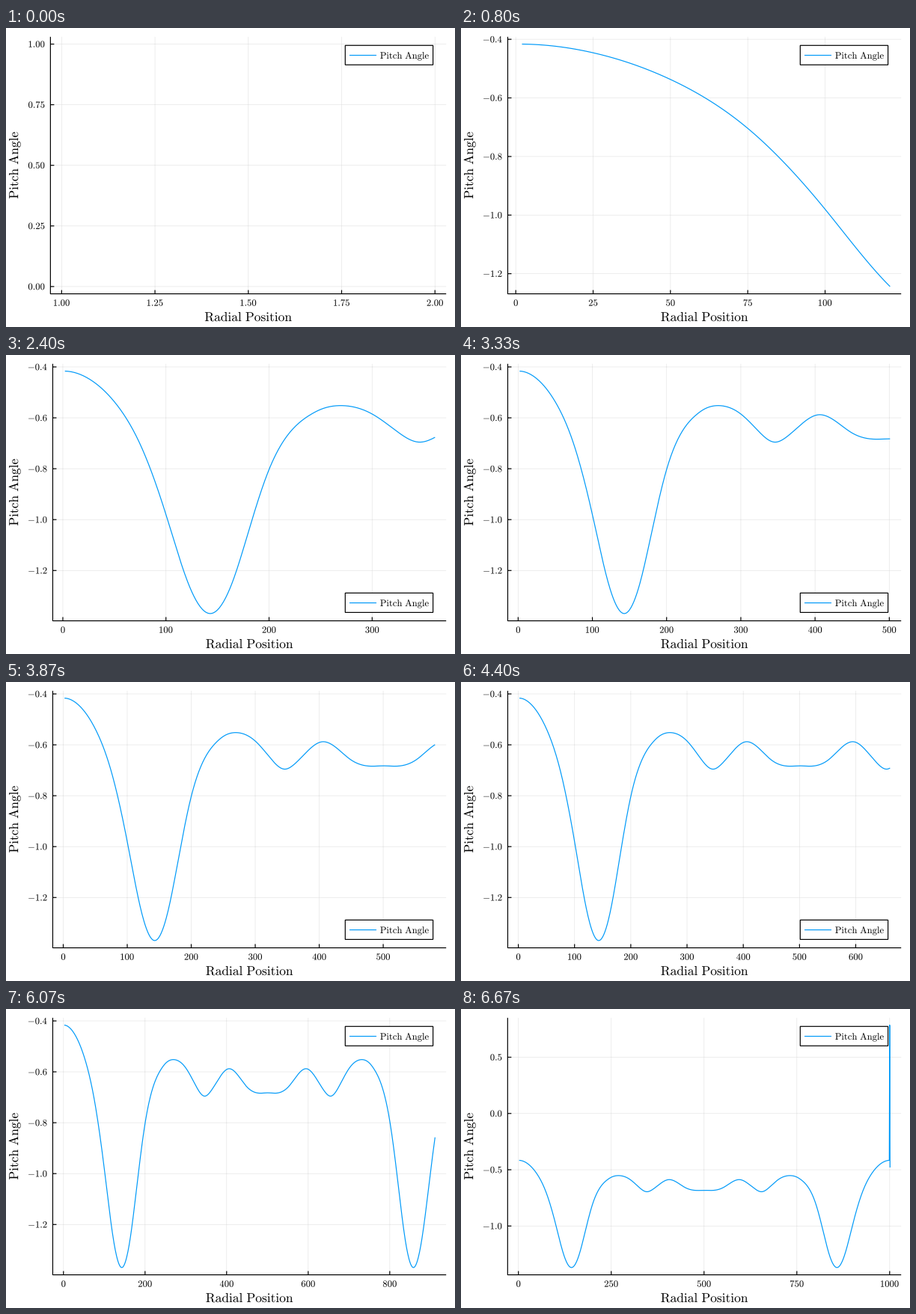
A matplotlib script that plays this animation: 600x400 px, repeating every 6740 ms.

```python
import math

import matplotlib.pyplot as plt
import numpy as np
from matplotlib.animation import FuncAnimation
from matplotlib.patches import PathPatch, Rectangle
from matplotlib.path import Path
from matplotlib.textpath import TextPath

plt.rcParams["mathtext.fontset"] = "cm"

W, H, DPI = 600, 400, 100
STEP_MS, LOOP_MS = 20, 6740
TOP, RIGHT, BOTTOM = 11.8, 588.2, 355.6
BLUE, BLACK, GRID = "#009af9", "black", (0, 0, 0, 0.1)
SMALL, LARGE = 12.65, 17.4

# Half of the profile; the other half mirrors it.
KNOTS = np.array([
    (1, -.4163), (25, -.446), (50, -.537), (75, -.704), (100, -.980),
    (121, -1.2439), (143, -1.3691), (165, -1.240), (180, -1.048),
    (200, -.803), (220, -.658), (240, -.588), (250, -.567), (271, -.552),
    (300, -.585), (323, -.650), (345.5, -.6955), (361, -.6765),
    (375, -.642), (404.5, -.588), (428, -.614), (449, -.658),
    (466, -.6785), (483, -.684), (500.5, -.6825),
])


def spline(px, py, x):
    """Cubic spline with flat ends."""
    n, h = len(px), np.diff(px)
    d = np.diff(py) / h
    a, b = np.eye(n), np.zeros(n)
    for j in range(1, n - 1):
        a[j, j - 1:j + 2] = 1 / h[j - 1], 2 / h[j - 1] + 2 / h[j], 1 / h[j]
        b[j] = 3 * (d[j - 1] / h[j - 1] + d[j] / h[j])
    m = np.linalg.solve(a, b)
    j = np.clip(np.searchsorted(px, x) - 1, 0, n - 2)
    t = (x - px[j]) / h[j]
    return (py[j] * (1 + 2 * t) * (1 - t) ** 2 + py[j + 1] * t * t * (3 - 2 * t)
            + h[j] * t * (1 - t) * (m[j] * (1 - t) - m[j + 1] * t))


pos = np.arange(2, 1002)
angle = spline(KNOTS[:, 0], KNOTS[:, 1], np.clip(np.minimum(pos, 1001 - pos), 1, None))
angle[-2:] = math.pi / 4, -0.48

fig = plt.figure(figsize=(W / DPI, H / DPI), dpi=DPI, facecolor="white")
ax = fig.add_axes([0, 0, 1, 1])
ax.set_axis_off()
ax.set_xlim(0, W)
ax.set_ylim(H, 0)


def line(color, px, z):
    return ax.plot([], [], color=color, lw=px * 72 / DPI, zorder=z, snap=False,
                   solid_capstyle="butt", solid_joinstyle="round")[0]


grid, curve, frame = line(GRID, 0.7, 1), line(BLUE, 1.2, 2), line(BLACK, 1.2, 3)
box = ax.add_patch(Rectangle((453.3, 0), 117.3, 26, fc="white", ec=BLACK,
                             lw=1.2 * 72 / DPI, zorder=4, snap=False))
key = line(BLUE, 1.2, 5)
ink = ax.add_patch(PathPatch(Path(np.zeros((1, 2))), fc=BLACK, lw=0, zorder=6))

glyphs = {}


def outline(s, size=SMALL):
    """Vertices starting at x = 0, codes and ink width of a text."""
    if (s, size) not in glyphs:
        path = TextPath((0, 0), s, size=size)
        ext = path.get_extents()
        glyphs[s, size] = path.vertices - (ext.x0, 0), path.codes, ext.width
    return glyphs[s, size]


def text(s, x, y, size=SMALL, align=0.5, upright=False):
    """Path of s on baseline y; align 0 is left, 1 is right."""
    verts, codes, width = outline(s, size)
    u, v = verts[:, 0] - align * width, verts[:, 1]
    if upright:
        u, v = -v, u
    return Path(np.column_stack([x + u, y - v]), codes)


def words(s):
    return r"$\mathrm{%s}$" % s.replace(" ", r"\ ")


def set_segments(artist, parts):
    """Show several polylines with one line artist."""
    pts = [p for part in parts for p in [*part, (np.nan, np.nan)]]
    artist.set_data(*zip(*pts))


def padded(lo, hi):
    pad = 0.03 * (hi - lo)
    return lo - pad, hi + pad


def ticks(lo, hi):
    """Round steps, about five ticks; returns values and labels."""
    best, score = None, -1
    z = math.floor(math.log10(hi - lo))
    for e in (z, z - 1):
        for q, nice in ((1, 1), (5, 0.9), (2, 0.7), (2.5, 0.5), (3, 0.2)):
            step = q * 10.0 ** e
            first, last = math.ceil(lo / step), math.floor(hi / step)
            count = last - first + 1
            if count < 2:
                continue
            value = 1.01 * max(0, 1 - abs(count - 5) / 5) + nice
            if value > score:
                best, score = (step, first, last), value
    step, first, last = best
    digits = 0
    while digits < 6 and abs(step * 10 ** digits - round(step * 10 ** digits)) > 1e-6:
        digits += 1
    values = [i * step for i in range(first, last + 1)]
    return values, [f"${v:.{digits}f}$" for v in values]


def legend_low(u, v):
    """True if the lower right corner is emptier than the upper right."""
    def load(corner):
        near = (u > 0.75) & (abs(v - corner) < 0.25)
        return np.sum(1 / (1 + 100 * ((1 - u) ** 2 + (v - corner) ** 2))[near])
    return load(0) < load(1)


def plot(k):
    xs, ys = pos[:10 * k], angle[:10 * k]
    x0, x1 = padded(1, 10 * k + 1 if k else 2)
    y0, y1 = padded(ys.min(), ys.max()) if k else padded(0, 1)
    xt, xlabels = ticks(x0, x1)
    yt, ylabels = ticks(y0, y1)
    left = 37.9 + max(outline(s)[2] for s in ylabels)

    def to_x(v):
        return left + (v - x0) / (x1 - x0) * (RIGHT - left)

    def to_y(v):
        return BOTTOM - (v - y0) / (y1 - y0) * (BOTTOM - TOP)

    rules = []
    edges = [[(left, TOP), (left, BOTTOM), (RIGHT, BOTTOM)]]
    texts = [text(words("Radial Position"), (left + RIGHT) / 2, 392.2, LARGE),
             text(words("Pitch Angle"), 16.2, (TOP + BOTTOM) / 2, LARGE, upright=True)]
    for v, s in zip(xt, xlabels):
        x = to_x(v)
        rules.append([(x, TOP), (x, BOTTOM)])
        edges.append([(x, BOTTOM - 5), (x, BOTTOM)])
        texts.append(text(s, x, 371.7))
    for v, s in zip(yt, ylabels):
        y = to_y(v)
        rules.append([(left, y), (RIGHT, y)])
        edges.append([(left, y), (left + 5, y)])
        texts.append(text(s, left - 8, y + 4.2, align=1))
    set_segments(grid, rules)
    set_segments(frame, edges)
    curve.set_data(to_x(xs), to_y(ys))

    low = k > 0 and legend_low((xs - x0) / (x1 - x0), (ys - y0) / (y1 - y0))
    y = 318.4 if low else 23.3
    box.set_y(y)
    key.set_data([459, 495], [y + 13.2] * 2)
    texts.append(text(words("Pitch Angle"), 500.2, y + 17.7, align=0))
    ink.set_path(Path.make_compound_path(*texts))


def draw(n):
    # Fifteen pictures a second, starts rounded to 10 ms.
    t = n * STEP_MS + 10
    plot(min(100, int((t + 4.9) * 0.015)))
    return []


def start():
    return draw(0)


anim = FuncAnimation(fig, draw, frames=LOOP_MS // STEP_MS, interval=STEP_MS,
                     init_func=start, repeat=True, repeat_delay=0,
                     cache_frame_data=False)
plt.show()
```
